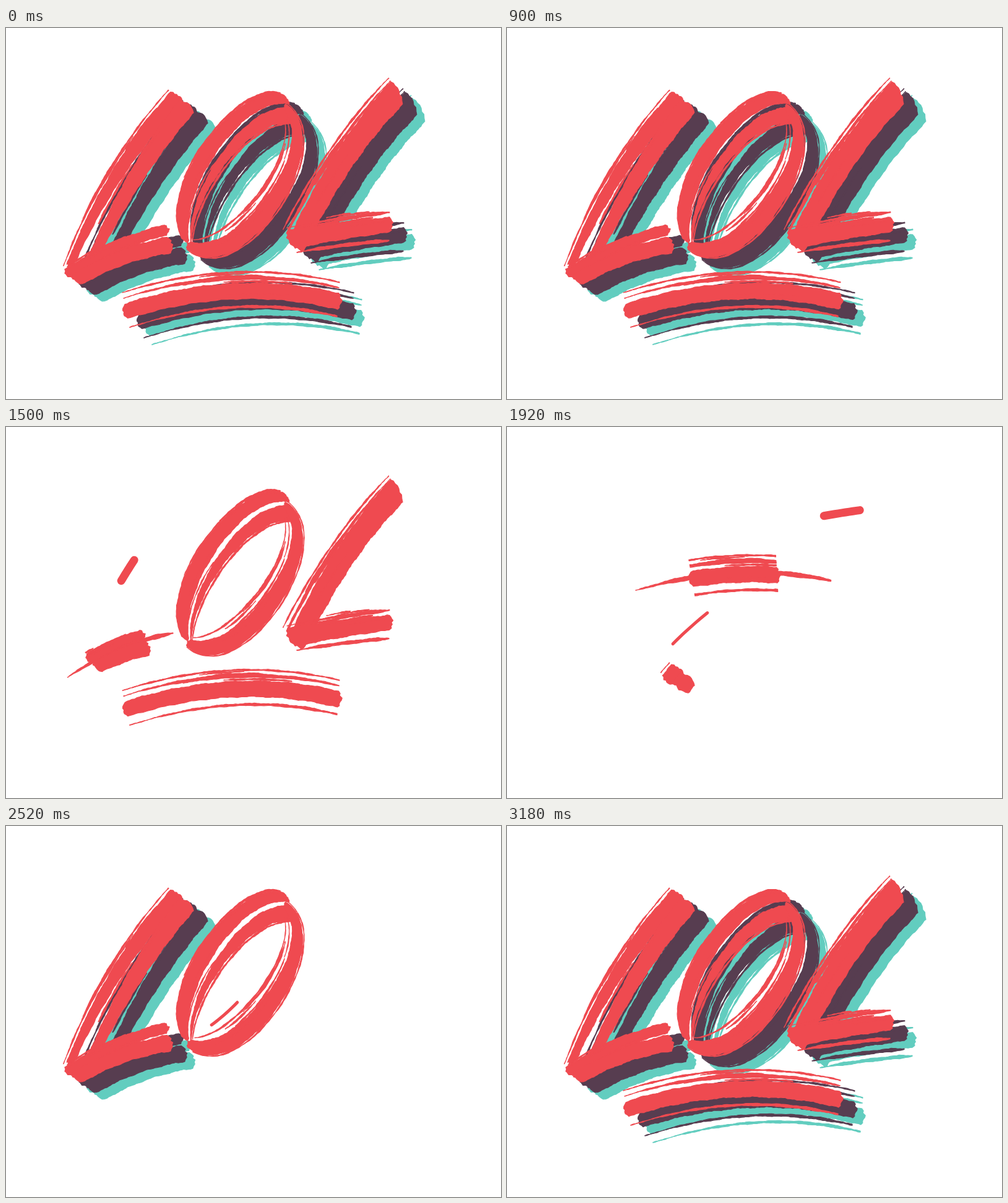
Write an HTML page with a canvas that moves like this. It is 800 px wide and 600 px high and loops after 3.21 s.

```html
<!DOCTYPE html>
<html lang="en">
<head>
<meta charset="utf-8">
<title>LOL brush lettering</title>
<style>
html, body { margin: 0; width: 100%; height: 100%; overflow: hidden; background: #fff; }
canvas { display: block; }
</style>
</head>
<body>
<canvas id="stage" width="800" height="600"></canvas>
<script>
const ctx = document.getElementById('stage').getContext('2d');
const LOOP = 3210, TRAVEL = 468, HAIRS = 8;
const RED = '#ef4a50', DARK = '#573d50', TEAL = '#62cdbf';

const mix = (a, b, k) => a + (b - a) * k;
const clamp = x => Math.min(1, Math.max(0, x));
const ramp = (t, start, time) => clamp((t - start) / time);
const smooth = x => x * x * (3 - 2 * x);
const rand = n => { const x = Math.sin(n * 127.1 + 3) * 43758.5; return x - Math.floor(x); };
const gap = (p, q) => Math.hypot(p[0] - q[0], p[1] - q[1]);

function bezier(c, u) {
  let p = c;
  while (p.length > 2) p = p.slice(2).map((q, i) => mix(p[i], q, u));
  return p;
}

// Point of a stroke: u runs along it, v across it from edge to edge.
function place(s, u, v) {
  const a = bezier(s.left, u), b = bezier(s.right, u);
  return [mix(a[0], b[0], v), mix(a[1], b[1], v)];
}

// Each band gives its v range at the start and at the end of the stroke.
let strokeCount = 0;
function stroke(left, right, ...bands) {
  const s = { left, right, seed: ++strokeCount * 20 }, mid = place(s, .5, .5);
  s.length = gap(place(s, 0, .5), mid) + gap(mid, place(s, 1, .5));
  s.width = gap(place(s, .5, 0), place(s, .5, 1));
  s.bands = bands.map(v => ({ v, from: 0, to: 1 }));
  for (let i = 0; i < HAIRS; i++) {
    const r = k => rand(s.seed + i * 3.7 + k);
    const v = r(1) * r(2) * .85 - .02, w = mix(1, 3, r(3)) / s.width, from = r(4) * .6;
    s.bands.push({ v: [v, v + w, v, v + w], from, to: from + mix(.2, .4, r(5)) });
  }
  return s;
}

const foldedL = [
  stroke([262, 100, 157, 215, 92, 385], [303, 137, 222, 231, 158, 354],
    [.1, .57, .1, .33], [.45, 1, .66, 1], [0, .03, 0, .03]),
  stroke([92, 388, 165, 335, 254, 310], [124, 414, 190, 375, 266, 364],
    [.1, .6, .16, .45], [.45, 1, .53, 1])
];
const letterO = [
  stroke([448, 106, 385, 75, 235, 250, 283, 340], [472, 158, 400, 140, 310, 270, 302, 345],
    [.06, .33, .05, .65], [.48, .95, .8, .88], [.95, .99, .95, .99]),
  stroke([450, 150, 465, 215, 364, 341, 303, 342], [455, 122, 548, 190, 380, 435, 292, 358],
    [.45, .92, .25, .95], [0, .04, 0, .05], [.97, 1, .97, 1])
];
const letterL = [
  stroke([618, 80, 518, 185, 447, 325], [642, 125, 555, 210, 482, 360],
    [.15, .97, .35, 1], [0, .04, 0, .04], [.1, .15, .15, .25]),
  stroke([452, 318, 540, 298, 620, 287], [470, 363, 545, 350, 619, 344],
    [.2, .85, .34, .76], [.1, .13, .14, .25], [.95, 1.04, .95, 1.04])
];
const underline = [
  stroke([188, 427, 365, 370, 539, 410], [200, 485, 375, 428, 535, 467],
    [.33, .74, .33, .79], [.14, .2, .14, .21], [0, .03, 0, .04], [.97, 1, .95, 1.03])
];

const glyphs = [
  { strokes: foldedL, enter: 1912, leave: 1370 },
  { strokes: letterO, enter: 2190, leave: 1560 },
  { strokes: letterL, enter: 2575, leave: 1765 },
  { strokes: underline, enter: 2752, leave: 1830 }
];

// Strokes are written one after the other, each glyph quicker than the last.
glyphs.forEach((g, i) => {
  let start = g.enter;
  g.strokes.forEach((s, n) => {
    s.enter = start;
    s.time = s.length * (.68 - .07 * i);
    s.leave = g.leave + 60 * n;
    g.written = start + s.time;
    start += s.time * .9;
  });
});

function drawBand(s, { v, from, to }, seed, lo, hi, boil) {
  const ragged = lo === 0 && hi < 1 ? (rand(seed) - .5) * .1 : 0;
  const a = Math.max(from, lo), z = Math.min(to, hi + ragged);
  if (z <= a) return;
  const bold = (v[1] - v[0] + v[3] - v[2]) / 2 * s.width > 9;
  const steps = Math.ceil((z - a) * s.length / 4) + 1, amp = (bold ? .6 : .4) / s.width;
  const rough = (d, k) => amp * (Math.sin(d * .13 + k * 5) + .6 * Math.sin(d * .37 + k * 9) + .5 * Math.sin(d * .8 + k * 3 + boil));
  const edge = (u, side) => {
    const v0 = mix(v[0], v[2], u), v1 = mix(v[1], v[3], u);
    const taper = bold ? 1 : clamp((u - from) / (to - from) * 4) * clamp(.3 + (to - u) / (to - from) * 5);
    return (v0 + v1) / 2 + side * taper * (v1 - v0) / 2;
  };
  const outline = [];
  const cap = (u, dir) => {
    if (bold) for (let i = 1; i < 8; i++) {
      const side = dir * (i / 4 - 1), jut = 5 * (1 - side * side) + 4 * (rand(seed + i * 7.3 + dir) - .5);
      outline.push(place(s, u + dir * jut / s.length, edge(u, side)));
    }
  };
  const run = (side, p, q) => {
    for (let i = 0; i <= steps; i++) {
      const u = mix(p, q, i / steps);
      outline.push(place(s, u, edge(u, side) + rough(u * s.length, seed + side * .2)));
    }
  };
  run(-1, a, z);
  cap(z, 1);
  run(1, z, a);
  cap(a, -1);
  ctx.beginPath();
  for (const p of outline) ctx.lineTo(...p);
  ctx.closePath();
  ctx.lineWidth = 1.2;
  ctx.fill();
  ctx.stroke();
}

function drawLine(s, v, a, z, width) {
  ctx.lineWidth = width;
  ctx.beginPath();
  for (let i = 0; i <= 10; i++) ctx.lineTo(...place(s, mix(a, z, i / 10), v));
  ctx.stroke();
}

function drawBands(s, lo, hi, boil) {
  s.bands.forEach((b, i) => drawBand(s, b, s.seed + i, lo, hi, boil));
}

// Shrinks towards the middle: a block on a long tail, then a drop.
function eraseStroke(s, t, boil) {
  const p = ramp(t, s.leave, 150), h = .5 * (1 - p);
  if (p === 0) return drawBands(s, -1, 2, boil);
  if (p === 1) return;
  if (h * s.length < 36) return drawLine(s, .5, .5 - h, .5 + h, 13);
  const tail = Math.min(.56, h * 2.3);
  drawBand(s, { v: [.44, .56, .44, .56], from: .5 - tail, to: .5 + tail }, s.seed, -1, 2, boil);
  drawBands(s, .5 - h, .5 + h, boil);
}

// Grows from its start while a loose flick runs along beside it.
function writeStroke(s, t, boil, flick) {
  const p = (t - s.enter) / s.time;
  if (p <= 0) return;
  drawBands(s, p < 1 ? 0 : -1, p < 1 ? p : 2, boil);
  if (flick && p < 1.5) drawLine(s, s.left[0] > s.left[4] ? -.3 : 1.3, p - .35, p - .12, 5);
}

function drawWord(t, leaving, dy, boil) {
  const depth = glyphs.map((g, i) => leaving
    ? [1 - ramp(t, 1200 + i * 30, 150), 1 - ramp(t, 1140 + i * 30, 120)]
    : [ramp(t, g.written + 10, 150), ramp(t, g.written + 190, 70)]);
  [TEAL, DARK, RED].forEach((color, layer) => {
    ctx.fillStyle = ctx.strokeStyle = color;
    glyphs.forEach((g, i) => {
      const dark = layer < 2 ? smooth(depth[i][0]) : 0, teal = layer < 1 ? smooth(depth[i][1]) : 0;
      if (layer === 0 && !teal || layer === 1 && !dark) return;
      ctx.save();
      ctx.translate(23 * dark + 13 * teal, 17 * dark + 11 * teal + dy);
      for (const s of g.strokes) leaving ? eraseStroke(s, t, boil) : writeStroke(s, t, boil, layer === 2);
      ctx.restore();
    });
  });
}

function render(t) {
  const p = clamp((t - 1455) / 1040);
  const rise = TRAVEL * (p < .5 ? 2 * p * p : 1 - 2 * (1 - p) ** 2);
  const boil = Math.floor(t / 60) * 2.4;
  ctx.fillStyle = '#fff';
  ctx.fillRect(0, 0, 800, 600);
  ctx.lineJoin = ctx.lineCap = 'round';
  if (t < 2010) drawWord(t, true, -rise, boil);
  if (t > 1890) drawWord(t, false, TRAVEL - rise, boil);
}

const start = performance.now();
let last = -1;
function tick() {
  const t = Math.floor((performance.now() - start) % LOOP / 30) * 30;
  if (t !== last) render(last = t);
  requestAnimationFrame(tick);
}
tick();
</script>
</body>
</html>
```
